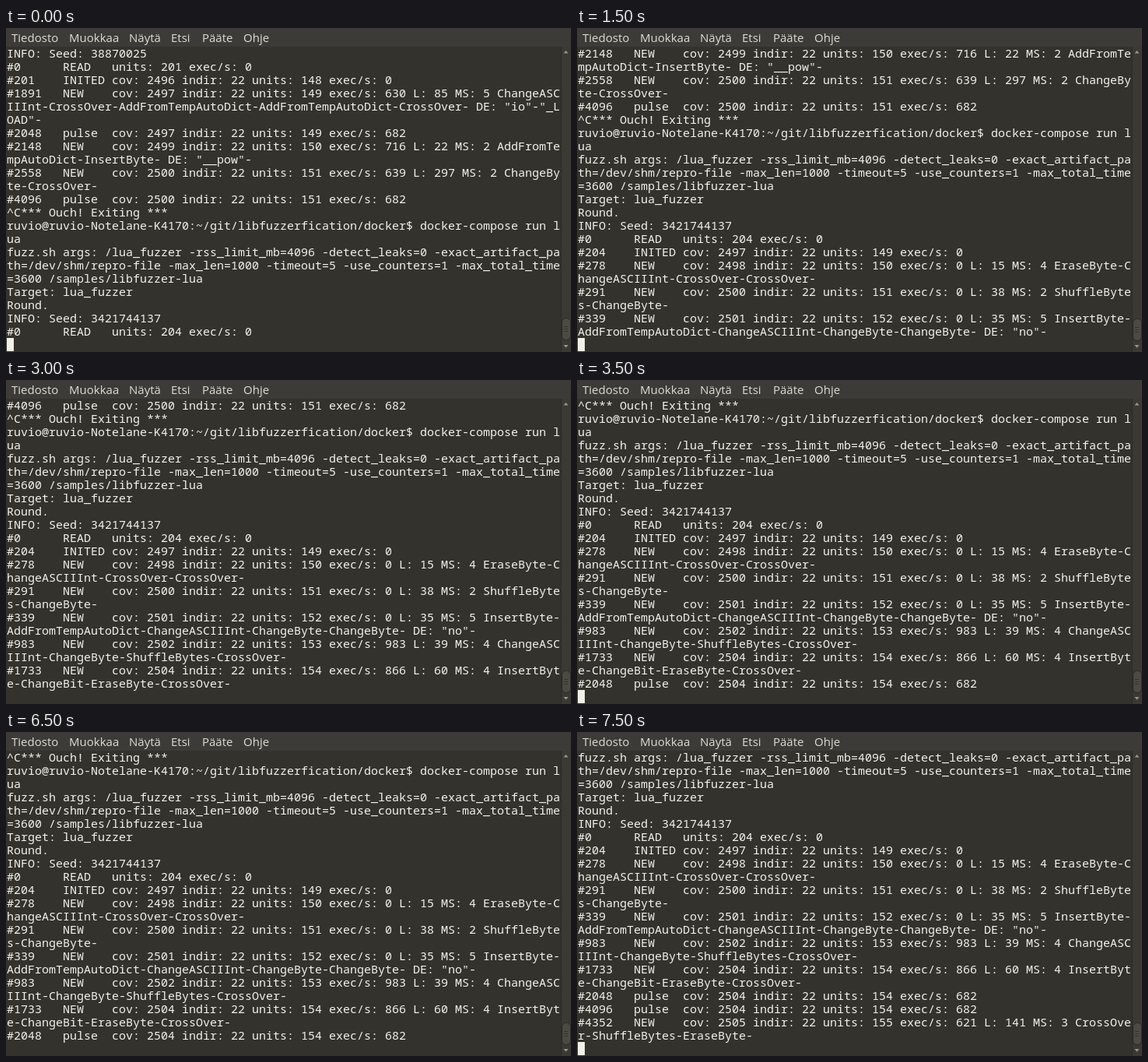
An HTML page for the animation above (8000 ms loop, 726x416 px).

```html
<!DOCTYPE html>
<html lang="fi">
<head>
<meta charset="utf-8">
<title>Pääte</title>
<style>
  html, body { margin: 0; width: 100%; height: 100%; overflow: hidden; background: #33322d; }
  #stage { position: relative; width: 726px; height: 416px; overflow: hidden; }
  #stage > * { position: absolute; margin: 0; }
  #menu { left: 0; top: 0; width: 726px; height: 24px; background: #3c3b37;
    font: 15px/24px "Open Sans", "Noto Sans", sans-serif; color: #dfdbd2; }
  #menu span { position: absolute; top: 0; }
  #log { left: 1px; top: 24px; font: 15px/17px "Noto Sans Mono", "Liberation Mono", monospace;
    font-variant-ligatures: none; color: #f2f1ea; }
  #cursor { left: 1px; top: 398px; width: 9px; height: 17px; background: #f2f1e8; }
  #bar { left: 713px; top: 24px; }
</style>
</head>
<body>
<div id="stage">
  <div id="menu"></div>
  <pre id="log"></pre>
  <div id="cursor"></div>
  <svg id="bar" width="13" height="392">
    <rect width="13" height="392" fill="#3a3934"/>
    <path d="M.5 0V392" stroke="#2d2c28"/>
    <path d="M3.5 8.5L6.5 5L9.5 8.5ZM3.5 383L6.5 386.5L9.5 383Z" fill="#99968c"/>
    <g id="thumb">
      <rect x="1.5" y="348.5" width="11" height="28" rx="5" fill="#4b4a44" stroke="#2a2925"/>
      <path d="M4 359.5h5M4 362.5h5M4 365.5h5" stroke="#35342f"/>
    </g>
  </svg>
</div>
<script>
const COLS = 79, ROWS = 22, LOOP = 8000;
const $ = id => document.getElementById(id);

const menu = { Tiedosto: 7, Muokkaa: 81, Näytä: 158, Etsi: 212, Pääte: 252, Ohje: 305 };
for (const [label, x] of Object.entries(menu)) {
  const item = document.createElement("span");
  item.textContent = label;
  item.style.left = x + "px";
  $("menu").append(item);
}

const stat = (n, kind, cov, units, rate, rest = "") =>
  ("#" + n).padEnd(8) + kind.padEnd(7) +
  `cov: ${cov} indir: 22 units: ${units} exec/s: ${rate}${rest}`;

const rows = [
  "INFO: Seed: 38870025",
  "#0      READ   units: 201 exec/s: 0",
  stat(201, "INITED", 2496, 148, 0),
  stat(1891, "NEW", 2497, 149, 630, ' L: 85 MS: 5 ChangeASCIIInt-CrossOver-AddFromTempAutoDict-AddFromTempAutoDict-CrossOver- DE: "io"-"_LOAD"-'),
  stat(2048, "pulse", 2497, 149, 682),
  stat(2148, "NEW", 2499, 150, 716, ' L: 22 MS: 2 AddFromTempAutoDict-InsertByte- DE: "__pow"-'),
  stat(2558, "NEW", 2500, 151, 639, " L: 297 MS: 2 ChangeByte-CrossOver-"),
  stat(4096, "pulse", 2500, 151, 682),
  "^C*** Ouch! Exiting ***",
  "ruvio@ruvio-Notelane-K4170:~/git/libfuzzerfication/docker$ docker-compose run lua",
  "fuzz.sh args: /lua_fuzzer -rss_limit_mb=4096 -detect_leaks=0 -exact_artifact_path=/dev/shm/repro-file -max_len=1000 -timeout=5 -use_counters=1 -max_total_time=3600 /samples/libfuzzer-lua",
  "Target: lua_fuzzer",
  "Round.",
  "INFO: Seed: 3421744137",
  "#0      READ   units: 204 exec/s: 0",
  stat(204, "INITED", 2497, 149, 0),
  stat(278, "NEW", 2498, 150, 0, " L: 15 MS: 4 EraseByte-ChangeASCIIInt-CrossOver-CrossOver-"),
  stat(291, "NEW", 2500, 151, 0, " L: 38 MS: 2 ShuffleBytes-ChangeByte-"),
  stat(339, "NEW", 2501, 152, 0, ' L: 35 MS: 5 InsertByte-AddFromTempAutoDict-ChangeASCIIInt-ChangeByte-ChangeByte- DE: "no"-'),
  stat(983, "NEW", 2502, 153, 983, " L: 39 MS: 4 ChangeASCIIInt-ChangeByte-ShuffleBytes-CrossOver-"),
  stat(1733, "NEW", 2504, 154, 866, " L: 60 MS: 4 InsertByte-ChangeBit-EraseByte-CrossOver-"),
  stat(2048, "pulse", 2504, 154, 682),
  stat(4096, "pulse", 2504, 154, 682),
  stat(4352, "NEW", 2505, 155, 621, " L: 141 MS: 3 CrossOver-ShuffleBytes-EraseByte-")
].flatMap(line => line.match(new RegExp(`.{1,${COLS}}`, "g")));

// [start ms, rows printed so far]
const output = [[0, 22], [500, 29], [2000, 31], [3000, 33], [3500, 34], [7000, 35], [7500, 37]];
// The cursor starts visible and toggles at these times.
const blinks = [500, 1500, 2000, 2500, 3000, 3500, 4500, 5000, 5500, 6000, 6500, 7500];

let shown = 0;
function draw(now) {
  const t = now % LOOP;
  const end = output.filter(([start]) => start <= t).pop()[1];
  if (end !== shown) {
    shown = end;
    $("log").textContent = rows.slice(end - ROWS, end).join("\n");
    $("thumb").setAttribute("transform", `translate(0 ${end > ROWS ? 1 : 0})`);
  }
  const toggles = blinks.filter(b => b <= t).length;
  $("cursor").style.visibility = toggles % 2 ? "hidden" : "visible";
}

const begin = performance.now();
function tick() {
  draw(performance.now() - begin);
  requestAnimationFrame(tick);
}
tick();
</script>
</body>
</html>
```
